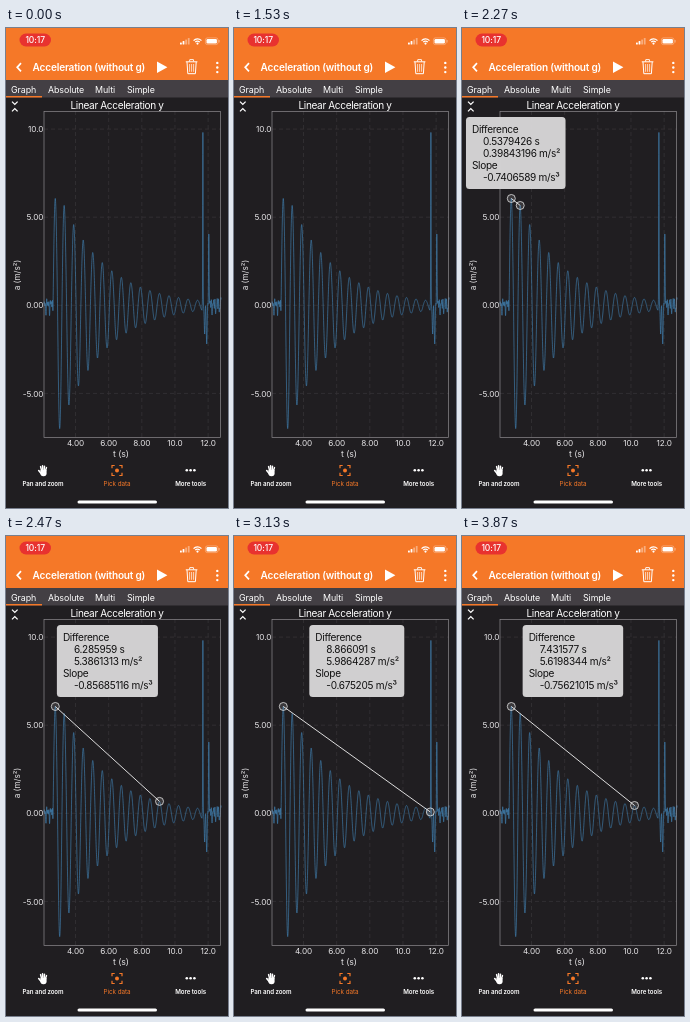
An HTML page with a canvas for the animation above (3990 ms loop, 222 px wide and 480 px high).

```html
<!DOCTYPE html>
<html lang="en">
<head>
<meta charset="utf-8">
<title>Linear acceleration graph</title>
<style>
  html, body { margin: 0; width: 100%; height: 100%; overflow: hidden; background: #201e21; }
  canvas { display: block; width: 222px; height: 480px; }
</style>
</head>
<body>
<canvas id="stage"></canvas>
<script>
const W = 222, H = 480, LOOP = 3990, FRAME = 200 / 3;
const ORANGE = '#f57828', BACK = '#201e21', WHITE = '#fff';
const PLOT = { left: 38, right: 215, top: 83, bottom: 409 };
const PX_PER_S = 16.58, PX_PER_A = 17.62, ZERO_Y = 277.3;
const SAMPLE = 0.0099619;
const FIRST_PEAK = 49.3, SECOND_PEAK = 58.2;
const PICK_FROM = 1660, DRAG_FROM = 34 * FRAME, BACK_FROM = 2950, BACK_TIME = 470;

const canvas = document.getElementById('stage');
const ctx = canvas.getContext('2d');
const dpr = window.devicePixelRatio || 1;
canvas.width = W * dpr;
canvas.height = H * dpr;

// Acceleration along the plot: damped swing, noise at rest, bumps at the end
function swing(x) {
  const k = (x - SECOND_PEAK) / (x < SECOND_PEAK ? SECOND_PEAK - FIRST_PEAK : 9.53);
  if (k < -1.25) return 0;
  const a = 5.667 * Math.exp(-0.2125 * k) * Math.cos(2 * Math.PI * k);
  if (a < 0) return a * 1.11;
  return k < -0.5 ? a * 0.865 : a;
}

const noise = x => 0.2 * (Math.sin(x * 5.3) + Math.sin(x * 3.4 + 1) + Math.sin(x * 1.7));
const bump = (x, center, height, width) => height * Math.exp(-(((x - center) / width) ** 2));

function acceleration(x) {
  if (x < 47) return noise(x);
  if (x < 196) return swing(x);
  return noise(x) * Math.min(1, (x - 196) / 8)
    + bump(x, 196.9, 9.8, 0.27) + bump(x, 198.6, -1.5, 0.6)
    + bump(x, 200.7, -2.3, 0.6) + bump(x, 202.8, 4.2, 0.4);
}

const curveY = x => ZERO_Y - acceleration(x) * PX_PER_A;

const curve = new Path2D();
for (let x = PLOT.left; x <= PLOT.right; x += 0.1) curve.lineTo(x, curveY(x));

function text(str, x, y, size, { color = WHITE, weight = 400, align = 'left', spacing = -0.035 } = {}) {
  ctx.font = `${weight} ${size}px Inter, "Liberation Sans", sans-serif`;
  ctx.letterSpacing = `${(spacing * size).toFixed(3)}px`;
  ctx.textAlign = align;
  ctx.fillStyle = color;
  ctx.fillText(str, x, y);
}

function rect(x, y, w, h, color, radius = 0) {
  ctx.fillStyle = color;
  ctx.beginPath();
  ctx.roundRect(x, y, w, h, radius);
  ctx.fill();
}

function line(points, color = WHITE, width = 1) {
  ctx.strokeStyle = color;
  ctx.lineWidth = width;
  ctx.beginPath();
  points.forEach(([x, y]) => ctx.lineTo(x, y));
  ctx.stroke();
}

function dot(x, y, r, color = WHITE) {
  ctx.fillStyle = color;
  ctx.beginPath();
  ctx.arc(x, y, r, 0, 2 * Math.PI);
  ctx.fill();
}

function drawStatusBar() {
  rect(13.5, 5.5, 31.5, 13, '#e8322f', 6.5);
  text('10:17', 29.2, 15.1, 8.5, { weight: 500, align: 'center', spacing: -0.01 });
  for (let i = 0; i < 4; i++) {
    const h = 2 + i * 1.5;
    rect(174 + i * 2.6, 16.5 - h, 1.8, h, i < 2 ? WHITE : 'rgba(255,255,255,.4)', 0.5);
  }
  ctx.strokeStyle = WHITE;
  ctx.lineWidth = 1.3;
  [3.1, 5.4].forEach(r => {
    ctx.beginPath();
    ctx.arc(191.5, 16.3, r, -Math.PI * 0.76, -Math.PI * 0.24);
    ctx.stroke();
  });
  dot(191.5, 15.6, 1.1);
  ctx.strokeStyle = 'rgba(255,255,255,.5)';
  ctx.lineWidth = 0.6;
  ctx.beginPath();
  ctx.roundRect(199.4, 9.9, 12.6, 6.7, 2);
  ctx.stroke();
  rect(200.5, 11, 10.4, 4.5, WHITE, 1.2);
  rect(212.7, 12.1, 0.8, 2.4, 'rgba(255,255,255,.5)');
}

function drawTrash() {
  line([[179.8, 33.8], [191.4, 33.8]], WHITE, 1);
  line([[183.5, 33.5], [183.8, 31.6], [187.4, 31.6], [187.7, 33.5]], WHITE, 0.9);
  line([[181, 34], [181.8, 45.7], [189.4, 45.7], [190.2, 34]], WHITE, 1);
  for (let x = 183.6; x < 188; x += 2) line([[x, 36], [x, 43.8]], WHITE, 0.7);
}

function drawHeader() {
  rect(0, 0, W, 52, ORANGE);
  drawStatusBar();
  line([[15, 35.2], [11.2, 39.3], [15, 43.4]], WHITE, 1.7);
  text('Acceleration (without g)', 26.6, 42.8, 10.06, { weight: 600, spacing: -0.018 });
  ctx.fillStyle = WHITE;
  ctx.beginPath();
  [[151, 33.6], [161.4, 39.3], [151, 45]].forEach(p => ctx.lineTo(...p));
  ctx.fill();
  drawTrash();
  for (let i = -1; i <= 1; i++) dot(211.3, 39.5 + i * 4.6, 1.2);

  rect(0, 52, W, 17.5, '#433f44');
  rect(0, 68, 36, 1.5, ORANGE);
  [['Graph', 5], ['Absolute', 42], ['Multi', 89], ['Simple', 121]]
    .forEach(([name, x]) => text(name, x, 64.9, 8.9, { spacing: -0.012 }));
}

function drawPlot() {
  line([[6, 73.6], [8.8, 76.4], [11.6, 73.6]], WHITE, 1.3);
  line([[6, 83.4], [8.8, 80.6], [11.6, 83.4]], WHITE, 1.3);
  text('Linear Acceleration y', 111, 80.5, 10.06, { align: 'center' });

  const label = { color: '#e6e5e7', spacing: -0.01 };
  ctx.setLineDash([4, 3]);
  ['4.00', '6.00', '8.00', '10.0', '12.0'].forEach((name, i) => {
    const x = 69.5 + i * 33.16;
    line([[x, PLOT.bottom], [x, PLOT.top]], '#353337', 0.8);
    text(name, x, 418, 8.2, { ...label, align: 'center' });
  });
  ['10.0', '5.00', '0.00', '-5.00'].forEach((name, i) => {
    const y = 101.1 + i * 88.1;
    line([[PLOT.left, y], [PLOT.right, y]], '#353337', 0.8);
    text(name, 37.3, y + 3.1, 8.2, { ...label, align: 'right' });
  });
  ctx.setLineDash([]);

  text('t (s)', 115, 428.8, 8.7, { ...label, align: 'center' });
  ctx.save();
  ctx.translate(14, 247);
  ctx.rotate(-Math.PI / 2);
  text('a (m/s²)', 0, 0, 8.2, { ...label, align: 'center' });
  ctx.restore();

  ctx.strokeStyle = '#4388bd';
  ctx.lineWidth = 0.6;
  ctx.stroke(curve);
  ctx.strokeStyle = '#8d8b8f';
  ctx.lineWidth = 0.7;
  ctx.strokeRect(PLOT.left, PLOT.top + 0.5, PLOT.right - PLOT.left - 0.5, PLOT.bottom - PLOT.top);
}

function drawHand() {
  ctx.lineCap = 'round';
  for (let i = 0; i < 4; i++) {
    const tip = 437.8 + 0.7 * (i - 1.2) ** 2 * 0.8;
    line([[34.6 + i * 1.95, tip], [36 + i, 444]], WHITE, 1.5);
  }
  line([[32.7, 442.6], [35.6, 446]], WHITE, 1.6);
  ctx.lineCap = 'butt';
  rect(34.4, 442, 6.2, 6.2, WHITE, [0, 0, 3, 3]);
}

function drawTarget() {
  const cx = 111, cy = 442.5;
  for (const sx of [-1, 1]) for (const sy of [-1, 1]) {
    line([[cx + sx * 2.3, cy + sy * 5], [cx + sx * 5, cy + sy * 5], [cx + sx * 5, cy + sy * 2.3]], ORANGE, 1.2);
  }
  dot(cx, cy, 2, ORANGE);
}

function drawTools() {
  drawHand();
  drawTarget();
  for (let i = -1; i <= 1; i++) dot(184.6 + i * 3.8, 442.2, 1.3);
  const label = { weight: 600, align: 'center', spacing: -0.01 };
  text('Pan and zoom', 37, 458.3, 6.15, label);
  text('Pick data', 111, 458.3, 6.3, { ...label, weight: 400, color: ORANGE });
  text('More tools', 184.6, 458.3, 6.15, label);
  rect(71.5, 472.4, 79.5, 3.2, WHITE, 1.6);
}

// Shortest decimal that keeps single precision
function formatFloat(v) {
  const f = Math.fround(v);
  for (let p = 6; p < 9; p++) {
    const s = f.toPrecision(p);
    if (Math.fround(+s) === f) return String(+s);
  }
  return f.toPrecision(9);
}

// Samples between both picks: a slowing drag to the right, then an eased return
function pickedSamples(ms) {
  const drag = t => 54 + 948 * (1 - Math.exp(-Math.max(0, t - DRAG_FROM) / 213));
  if (ms < BACK_FROM) return Math.round(drag(ms));
  const u = Math.min(1, (ms - BACK_FROM) / BACK_TIME);
  const far = drag(BACK_FROM);
  return Math.round(far + (746 - far) * u * u * (3 - 2 * u));
}

function drawTooltip(center, dt, da) {
  const rows = [
    ['Difference', 0],
    [`${formatFloat(dt)} s`, 11],
    [`${formatFloat(Math.abs(da))} m/s²`, 11],
    ['Slope', 0],
    [`${formatFloat(da / dt)} m/s³`, 11]
  ];
  const size = 10.06, spacing = -0.03;
  ctx.font = `400 ${size}px Inter, "Liberation Sans", sans-serif`;
  ctx.letterSpacing = `${(spacing * size).toFixed(3)}px`;
  const inner = Math.max(...rows.map(([s, indent]) => indent + ctx.measureText(s).width));
  const width = inner + 11.5;
  const left = center - width / 2;
  rect(left, 89, width, 72, 'rgba(214,213,214,.97)', 3.5);
  rows.forEach(([s, indent], i) =>
    text(s, left + 6 + indent, 105.3 + i * 12, size, { color: '#111', spacing }));
}

function drawPick(ms) {
  const dt = pickedSamples(ms) * SAMPLE;
  const x0 = FIRST_PEAK, x1 = x0 + dt * PX_PER_S;
  const ends = [[x0, curveY(x0)], [x1, curveY(x1)]];
  line(ends, '#f2f2f2', 0.9);
  ends.forEach(([x, y]) => {
    dot(x, y, 4, 'rgba(255,255,255,.12)');
    ctx.strokeStyle = '#e4e4e4';
    ctx.lineWidth = 0.8;
    ctx.beginPath();
    ctx.arc(x, y, 4, 0, 2 * Math.PI);
    ctx.stroke();
  });
  drawTooltip((x0 + x1) / 2, dt, acceleration(x1) - acceleration(x0));
}

function draw() {
  const now = performance.now() % LOOP;
  const ms = Math.floor((now + 4) / FRAME) * FRAME;
  ctx.setTransform(dpr, 0, 0, dpr, 0, 0);
  rect(0, 0, W, H, BACK);
  drawHeader();
  drawPlot();
  drawTools();
  if (ms >= PICK_FROM) drawPick(ms);
  requestAnimationFrame(draw);
}
draw();
</script>
</body>
</html>
```
